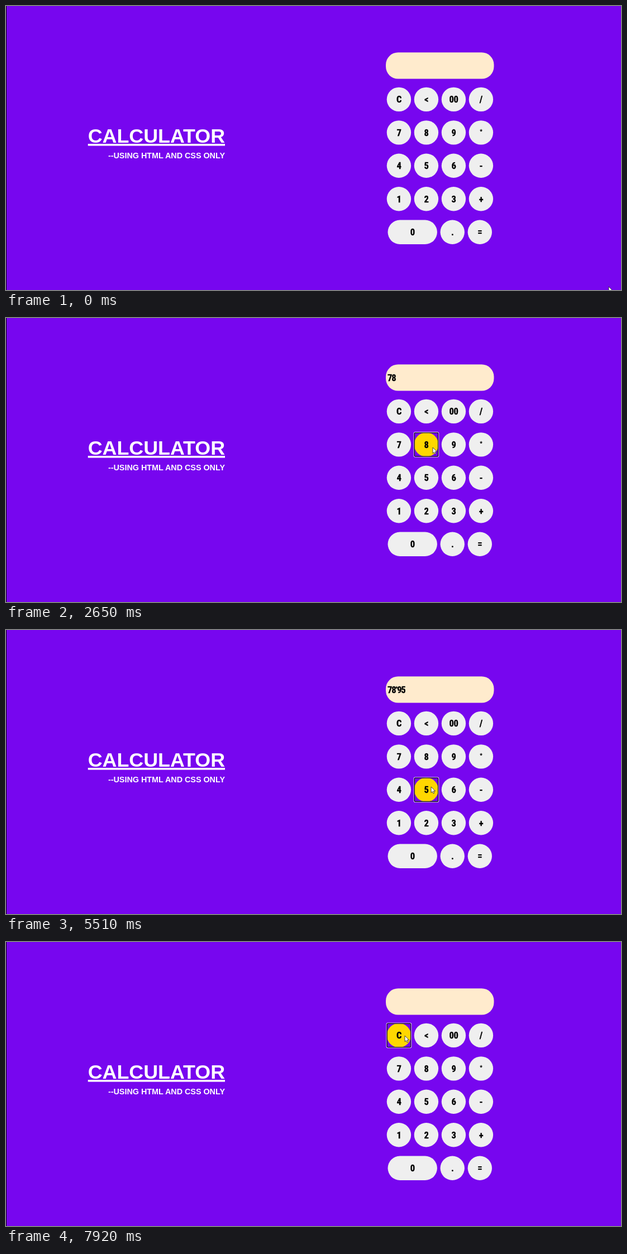
Animation of 1101x509 px, one loop 8000 ms. Source, as an HTML page:

```html
<!DOCTYPE html>
<html lang="en">
<head>
<meta charset="utf-8">
<title>Calculator</title>
<style>
  html, body { margin: 0; width: 100%; height: 100%; overflow: hidden; background: #7706ef; }
  svg { display: block; }
  text { white-space: pre; }
  .heading { font: bold 35.8px "Liberation Sans", Arial, sans-serif; fill: #fff; text-anchor: end; }
  .title { text-decoration: underline; }
  .subtitle { font-size: 14.35px; }
  .bold {
    font: 900 16.5px Impact, "Roboto Condensed", "Open Sans Condensed", "Liberation Sans Narrow", "Noto Sans", sans-serif;
    font-stretch: 62.5%;
    stroke: #000;
    stroke-width: .3px;
  }
  .label { text-anchor: middle; letter-spacing: -.4px; }
  .entry { letter-spacing: -1.2px; }
  .star { font-size: 9px; }
  .key { fill: #efefef; }
  .key.hover { fill: #ffd700; }
  .hint { font: 10px "Noto Sans", sans-serif; fill: #1c1c28; }
  .ring { fill: none; }
  .menu { fill: #fff; filter: drop-shadow(0 1px 1px rgba(0, 0, 0, .35)); }
</style>
</head>
<body>
<svg id="stage" width="1101" height="509" viewBox="0 0 1101 509">
  <rect width="1101" height="509" fill="#7706ef"/>
  <rect width="1" height="509" fill="#000"/>
  <text class="heading title" x="392" y="245">CALCULATOR</text>
  <text class="heading subtitle" x="392" y="273">--USING HTML AND CSS ONLY</text>
  <rect x="680" y="83.2" width="193.5" height="47.4" rx="22" fill="#ffebcd"/>
  <text id="entry" class="bold entry" x="683" y="113"></text>
  <g id="keys"></g>
  <g id="ring" class="ring">
    <rect id="ringOuter" rx="2" stroke="#fff" stroke-width=".9"/>
    <rect id="ringInner" rx="1.5" stroke="#151018" stroke-width="1.3"/>
  </g>
  <g id="menu">
    <rect x="683" y="98" width="1" height="18" fill="#222"/>
    <rect class="menu" x="679.8" y="130.8" width="194" height="63.5" rx="2"/>
    <text class="hint" x="688" y="153">56÷64</text>
    <text class="hint" x="688" y="178.7">56÷64=</text>
  </g>
  <path id="arrow" d="M0 0V10.6L2.4 8.4 4 12 5.8 11.2 4.2 7.7H7.5Z" fill="#fff" stroke="#222" stroke-width=".8"/>
  <path id="beam" d="M-2.5-7H2.5M0-7V7M-2.5 7H2.5" stroke="#222" fill="none"/>
</svg>
<script>
const LOOP = 8000;
const SVG = 'http://www.w3.org/2000/svg';
const $ = id => document.getElementById(id);

const boxes = { display: { x: 680, y: 83.2, w: 193.5, h: 47.4 } };
const keys = [];

function make(tag, attrs) {
  const node = document.createElementNS(SVG, tag);
  setAll(node, attrs);
  $('keys').append(node);
  return node;
}

function setAll(node, attrs) {
  for (const name in attrs) node.setAttribute(name, attrs[name]);
}

function addKey(label, cx, cy, w = 43.4) {
  const h = 43.4, x = cx - w / 2, y = cy - h / 2;
  const node = make('rect', { class: 'key', x, y, width: w, height: h, rx: h / 2 });
  const star = label === '*';
  make('text', { class: 'bold label' + (star ? ' star' : ''), x: cx, y: cy + (star ? 1 : 5.9) }).textContent = label;
  boxes[label] = { x, y, w, h };
  keys.push({ node, cx, cy, r: h / 2, half: (w - h) / 2 });
}

[['C', '<', '00', '/'], ['7', '8', '9', '*'], ['4', '5', '6', '-'], ['1', '2', '3', '+']]
  .forEach((row, r) => row.forEach((label, c) => addKey(label, 703.4 + 49 * c, 167.4 + 59.45 * r)));
addKey('0', 727.7, 405.3, 88.4);
addKey('.', 799.2, 405.3);
addKey('=', 848.3, 405.3);

// Pointer moves: first step, last step, step count, points passed through
const START = [1079, 503];
const moves = [
  [70, 770, 10, [[784, 92]]],
  [930, 1720, 11, [[725, 98], [645, 180], [643, 246], [686, 224]]],
  [1790, 1870, 2, [[695, 220]]],
  [2030, 2650, 9, [[764, 232]]],
  [2800, 3580, 11, [[800, 180], [846, 172]]],
  [3810, 4040, 4, [[850, 226]]],
  [4200, 4440, 4, [[806, 229]]],
  [4580, 5360, 11, [[757, 280]]],
  [5450, 5510, 2, [[761, 281]]],
  [5680, 6290, 9, [[846, 398]]],
  [6600, 6600, 1, [[847, 400]]],
  [6920, 7700, 11, [[712, 166]]],
  [7770, 7920, 3, [[714, 168]]],
];

// Focus follows the press, text follows the release
const focusAt = [[0, ''], [930, 'display'], [1870, '7'], [2490, '8'], [4040, '*'], [4580, '9'], [5360, '5'], [6460, '='], [7770, 'C']];
const textAt = [[0, ''], [2030, '7'], [2570, '78'], [4200, '78*'], [4660, '78*9'], [5450, '78*95'], [6600, '7410'], [7850, '']];
const MENU = [1010, 1870];

const current = (list, t) => list.filter(([at]) => at <= t).pop()[1];
const smooth = u => u * u * (3 - 2 * u);

function pointer(t) {
  let from = START;
  for (const [start, end, count, points] of moves) {
    if (t < start) break;
    const gap = count > 1 ? (end - start) / (count - 1) : 1;
    const step = Math.min(count, Math.floor((t - start) / gap + 1e-6) + 1);
    if (step < count) {
      const path = [from, ...points];
      const along = smooth(step / count) * points.length;
      const i = Math.floor(along), u = along - i;
      return path[i].map((v, axis) => v + (path[i + 1][axis] - v) * u);
    }
    from = points[points.length - 1];
  }
  return from;
}

function placeRing(name) {
  $('ring').style.display = name ? '' : 'none';
  if (!name) return;
  const { x, y, w, h } = boxes[name];
  const fit = (id, grow) => setAll($(id), { x: x - grow, y: y - grow, width: w + 2 * grow, height: h + 2 * grow });
  fit('ringOuter', .6);
  fit('ringInner', -.5);
}

function draw(t) {
  const [x, y] = pointer(t);
  const menuOpen = t >= MENU[0] && t < MENU[1];
  const d = boxes.display;
  const inDisplay = x > d.x && x < d.x + d.w && y > d.y && y < d.y + d.h;

  for (const { node, cx, cy, r, half } of keys) {
    const dx = Math.max(0, Math.abs(x - cx) - half);
    const covered = menuOpen && y < 194;
    node.classList.toggle('hover', !covered && Math.hypot(dx, y - cy) < r);
  }
  placeRing(current(focusAt, t));
  $('menu').style.display = menuOpen ? '' : 'none';

  const text = current(textAt, t);
  const [head, tail] = text.split('*');
  $('entry').innerHTML = tail === undefined ? text
    : `${head}<tspan class="star" dy="-5">*</tspan><tspan dy="5">${tail}</tspan>`;

  $('arrow').style.display = inDisplay ? 'none' : '';
  $('beam').style.display = inDisplay ? '' : 'none';
  for (const id of ['arrow', 'beam']) $(id).setAttribute('transform', `translate(${x} ${y})`);
}

const begin = performance.now();
function tick() {
  draw((performance.now() - begin) % LOOP);
  requestAnimationFrame(tick);
}
tick();
</script>
</body>
</html>
```
